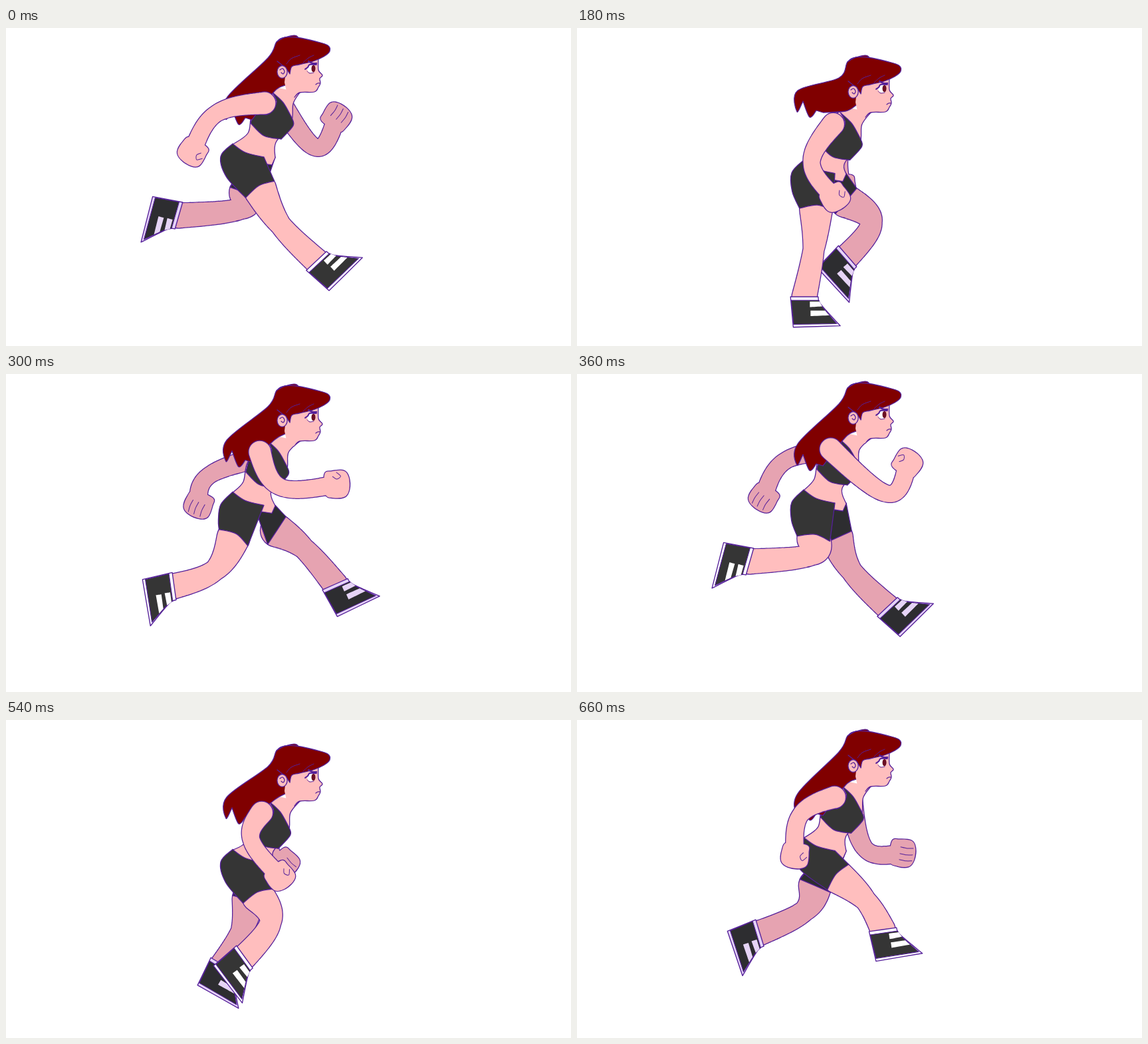
Animation of 850x478 px, one loop 720 ms. Source, as an HTML page with a canvas:

```html
<!DOCTYPE html>
<html lang="en">
<head>
<meta charset="utf-8">
<title>Run cycle</title>
<style>
html, body { margin: 0; width: 100%; height: 100%; overflow: hidden; background: #fff; }
canvas { display: block; }
</style>
</head>
<body>
<canvas id="stage" width="850" height="478"></canvas>
<script>
const ctx = document.getElementById('stage').getContext('2d');
const STEP = 60, STEPS = 12;
const LINE = '#55209a', HAIR = '#800000', WHITE = '#fff';
const NEAR = { skin: '#ffbebe', cloth: '#353535', trim: WHITE };
const FAR = { skin: '#e6a3b1', cloth: '#2d2d30', trim: '#e6d4f6' };

// Key poses: step, head drop, then near arm, near leg, far arm, far leg.
// An arm is elbow and fist; a leg is knee, ankle and foot angle in degrees.
const keys = [
  [0, 0, [316,129, 281,185], [413,296, 467,350, -43], [467,180, 497,135], [352,272, 260,282, 106]],
  [1, 22, [335,158, 315,225], [401,308, 430,385, -23], [432,207, 484,187], [372,306, 293,336, 94]],
  [3, 30, [353,202, 387,254], [356,333, 342,404, 0], [395,195, 398,238], [443,292, 407,343, 49]],
  [5, 4, [413,170, 496,166], [314,295, 253,319, 82], [308,151, 290,195], [448,262, 495,316, -24]],
  [7, 23, [402,197, 470,224], [360,312, 293,328, 94], [338,182, 322,222], [410,312, 424,389, -12]],
  [9, 25, [369,180, 411,234], [398,304, 359,356, 54], [398,195, 418,215], [354,318, 326,368, 31]],
  [11, 3, [336,143, 328,202], [434,271, 460,315, -8], [434,194, 488,200], [342,287, 275,320, 73]]];

// Half a cycle after the start the near and far limbs trade places.
const [, drop, ...limbs] = keys[0];
keys.splice(4, 0, [6, drop, limbs[2], limbs[3], limbs[0], limbs[1]]);

const blend = (a, b, t) => Array.isArray(a) ? a.map((v, i) => blend(v, b[i], t)) : a + (b - a) * t;
const pairs = flat => Array.from({ length: flat.length / 2 }, (_, i) => flat.slice(2 * i, 2 * i + 2));
const shift = (flat, dx, dy) => pairs(flat).map(([x, y]) => [x + dx, y + dy]);

function poseAt(step) {
  const j = Math.max(1, keys.findIndex(key => key[0] >= step));
  const [a, b] = [keys[j - 1], keys[j]];
  return blend(a, b, (step - a[0]) / (b[0] - a[0]));
}

// Smooth curve through points, with sharp turns at the listed corners.
function curve(points, corners = [], closed = true) {
  const path = new Path2D(), n = points.length, at = i => points[(i + n) % n];
  const sharp = i => corners.includes(i % n) || (!closed && (i === 0 || i === n - 1));
  path.moveTo(...points[0]);
  for (let i = 0; i < (closed ? n : n - 1); i++) {
    const p = at(i), q = at(i + 1);
    const before = sharp(i) ? p : at(i - 1), after = sharp(i + 1) ? q : at(i + 2);
    path.bezierCurveTo(p[0] + (q[0] - before[0]) / 6, p[1] + (q[1] - before[1]) / 6,
      q[0] - (after[0] - p[0]) / 6, q[1] - (after[1] - p[1]) / 6, ...q);
  }
  return path;
}

function fill(path, color) {
  ctx.fillStyle = color;
  ctx.fill(path);
}

function line(path, width = 1.3) {
  ctx.lineWidth = width;
  ctx.stroke(path);
}

function shape(path, color, width) {
  fill(path, color);
  line(path, width);
}

const sketch = (flat, width) => line(curve(pairs(flat), [], false), width);

function oval(x, y, rx, ry) {
  const path = new Path2D();
  path.ellipse(x, y, rx, ry, 0, 0, Math.PI * 2);
  return path;
}

function placed([x, y], angle, paint) {
  ctx.save();
  ctx.translate(x, y);
  ctx.rotate(angle);
  paint();
  ctx.restore();
}

// A bent limb: overlapping discs along a curve through three joints.
function limb([a, b, c], [ra, rb, rc]) {
  const path = new Path2D(), n = 60;
  const slope = [(c[0] - a[0]) / 2, (c[1] - a[1]) / 2];
  const disc = (p, q, mp, mq, rp, rq, t) => {
    const h = t * t * (3 - 2 * t), u = 1 - t;
    const [x, y] = [0, 1].map(k => p[k] * (1 - h) + q[k] * h + mp[k] * t * u * u - mq[k] * t * t * u);
    const r = rp + (rq - rp) * t - 0.6;
    path.moveTo(x + r, y);
    path.arc(x, y, r, 0, Math.PI * 2);
  };
  const away = [0, 1].map(k => 1.5 * (b[k] - a[k]) - slope[k] / 2);
  const home = [0, 1].map(k => 1.5 * (c[k] - b[k]) - slope[k] / 2);
  for (let i = 0; i <= n; i++) {
    disc(a, b, away, slope, ra, rb, i / n);
    disc(b, c, slope, home, rb, rc, i / n);
  }
  return path;
}

// Stroking before filling leaves only the outline of the union.
function union(path, color) {
  line(path, 2.5);
  fill(path, color);
}

function arm(shoulder, joints, look) {
  const [elbow, hand] = pairs(joints);
  const angle = Math.atan2(hand[1] - elbow[1], hand[0] - elbow[0]);
  const fist = curve(pairs([-16,-16, -5,-20, 13,-20, 20,-10, 20,8, 13,19, -4,20, -16,14]));
  const path = limb([shoulder, elbow, hand], [17, 13, 14]);
  path.addPath(fist, new DOMMatrix().translate(...hand).rotate(angle * 180 / Math.PI));
  union(path, look.skin);
  placed(hand, angle, () => {
    if (look === NEAR) sketch([2,-18, 8,-12, 2,-8, -4,-12], 1);
    else for (const y of [-9, 1, 10]) sketch([-2,y, 8,y + 1, 17,y], 1);
  });
}

function foot(look) {
  ctx.scale(1.04, 1.04);
  shape(curve(pairs([-20,0, 20,0, 24,11, 52,42, -16,44]), [0, 1, 3, 4]), look.trim);
  shape(curve(pairs([-19,5, 21,5, 25,13, 47,39, -15.5,40]), [0, 1, 3, 4]), look.cloth, 1);
  fill(curve(pairs([8,7, 22,7, 26,14, 8,15]), [0, 1, 2, 3]), look.trim);
  fill(curve(pairs([9,20, 30,20, 36,27, 9,28]), [0, 1, 2, 3]), look.trim);
}

// The hem lies a fixed way down the thigh and square to it.
function hemOf(hip, joints) {
  const angle = Math.atan2(joints[1] - hip[1], joints[0] - hip[0]);
  const dx = Math.cos(angle), dy = Math.sin(angle);
  const mid = [hip[0] + 40 * dx, hip[1] + 40 * dy];
  return { mid, front: [mid[0] + 25 * dy, mid[1] - 25 * dx], back: [mid[0] - 25 * dy, mid[1] + 25 * dx] };
}

function leg(hem, joints, look) {
  const [knee, ankle] = pairs(joints.slice(0, 4));
  union(limb([hem.mid, knee, ankle], [25, 16, 19]), look.skin);
  placed(ankle, joints[4] * Math.PI / 180, () => foot(look));
}

// The crown follows the head while the tips trail behind in a slow wave.
function hairBack(bob, step) {
  const y = 135 - 11 * Math.sin(step / STEPS * Math.PI * 2);
  const top = shift([440,15, 420,14, 407,21, 394,45], 0, bob);
  const tips = shift([3,-30, 2,2, 11,-14, 21,10, 31,0, 41,3], 329, y);
  const nape = shift([404,95, 420,86, 440,60], 0, bob);
  shape(curve([...top, ...tips, ...nape], [6, 8, 9, 11, 12]), HAIR);
}

function head() {
  const profile = [470,42, 470,63, 476,71, 472,76, 473,83, 470,89, 464,96, 442,97, 434,104];
  fill(curve(pairs([...profile, 424,104, 419,82, 423,48]), [0, 8, 9, 10, 11]), NEAR.skin);
  sketch(profile);
  sketch([466,85, 469,83, 472,83]);
  fill(oval(459, 61, 6, 6.3), WHITE);
  fill(oval(462.5, 61, 3, 5.2), '#6b0f24');
  sketch([453,65, 457,68, 463,67], 1);
  sketch([450,62, 454,59, 457,55, 467,55], 2);
  const fringe = [407,21, 420,14, 440,14.5, 465,20, 484,26, 487,35, 478,43, 462,50, 441,55, 430,58, 427,69, 421,60, 408,50];
  shape(curve(pairs(fringe), [10, 11], false), HAIR);
  sketch([455,50, 461,53, 467,53], 2.4);
  sketch([422,54, 429,46, 442,41], 1);
  sketch([447,52, 455,45, 463,41], 1);
  shape(oval(415.5, 66, 7.6, 9.5), NEAR.skin);
  sketch([412,63, 416,61, 419,65, 417,69, 414,67]);
}

function draw(step) {
  const [, bob, nearArm, nearLeg, farArm, farLeg] = poseAt(step);
  const sink = bob * 0.82;                // the hips drop a little less than the head
  const lean = (281 - nearArm[2]) / 30;   // the chest turns against the near fist
  const chest = flat => shift(flat, lean, bob * 1.05);
  const waist = flat => shift(flat, 0, sink);
  const nearHem = hemOf([362, 208 + sink], nearLeg), farHem = hemOf([374, 210 + sink], farLeg);

  ctx.fillStyle = WHITE;
  ctx.fillRect(0, 0, 850, 478);
  ctx.strokeStyle = LINE;
  ctx.lineJoin = ctx.lineCap = 'round';

  arm(...chest([414,115]), farArm, FAR);
  leg(farHem, farLeg, FAR);
  shape(curve([...waist([372,191, 405,194]), farHem.front, farHem.back], [0, 1, 2, 3]), FAR.cloth);
  shape(curve([...shift([410,90], 0, bob), ...chest([390,100, 370,130, 364,158]),
    ...waist([341,175, 360,200, 400,206, 405,195]), ...chest([406,172, 429,142, 432,114]),
    ...shift([442,97], 0, bob)], [4, 5, 6, 7], false), NEAR.skin);
  shape(curve(chest([400,96, 407,112, 393,130, 373,123, 368,143, 388,162, 414,167, 432,147, 430,135, 417,112]),
    [0, 3, 4, 6, 8]), NEAR.cloth);
  leg(nearHem, nearLeg, NEAR);
  const seat = waist([319,210])[0];
  shape(curve([...waist([341,174, 360,187, 388,194]), nearHem.front, blend(nearHem.mid, waist([372,205])[0], 0.15),
    nearHem.back, blend(seat, nearHem.back, 0.3), ...waist([323,193])], [0, 2, 3, 5]), NEAR.cloth);
  hairBack(bob, step);
  placed([0, bob], 0, head);
  arm(...chest([389,113]), nearArm, NEAR);
}

function tick() {
  draw(Math.floor(performance.now() / STEP) % STEPS);
  requestAnimationFrame(tick);
}
tick();
</script>
</body>
</html>
```
